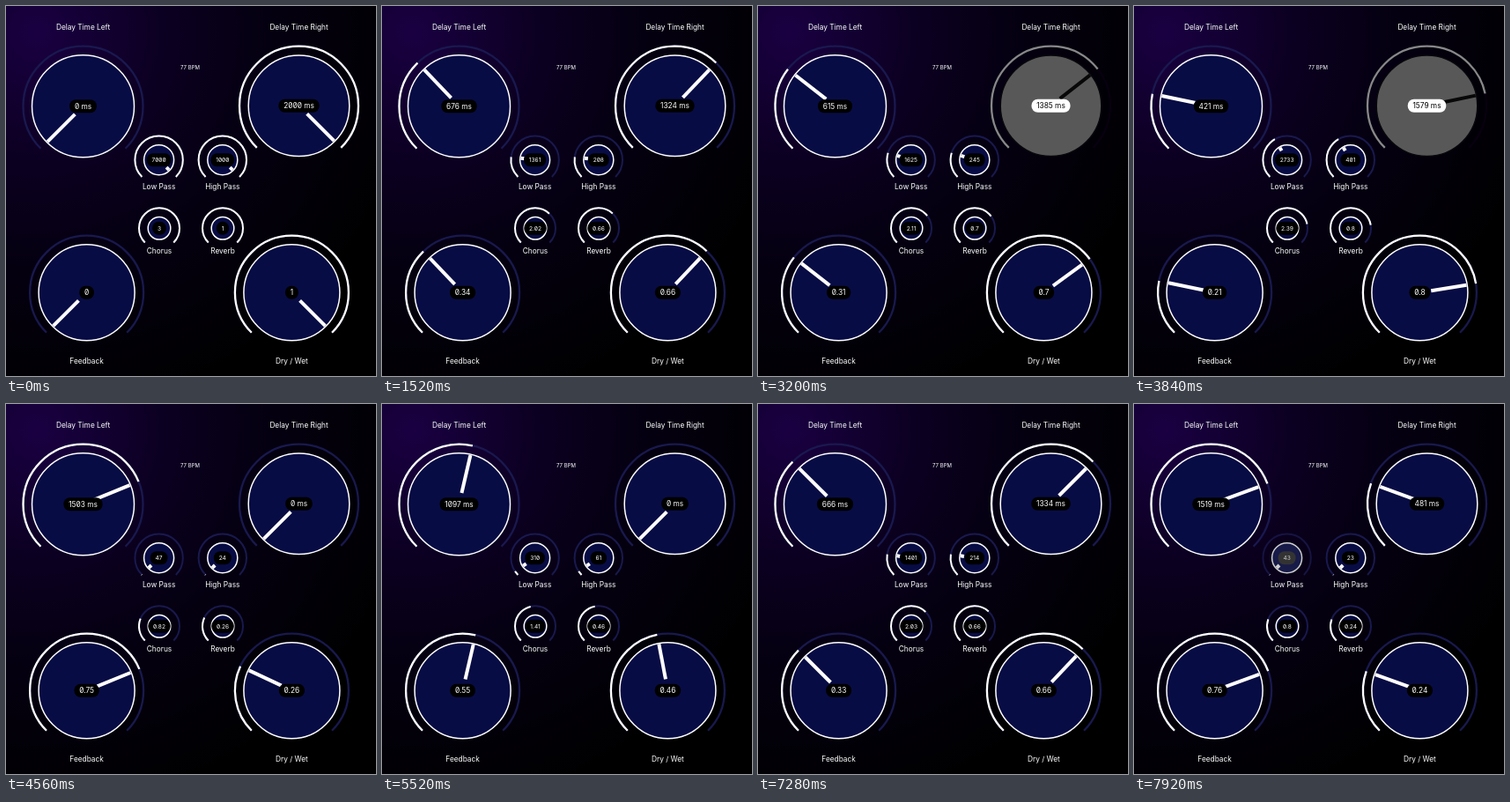
Animation, 420 px wide and 420 px high, one loop 8 s. Source, as an HTML page:

```html
<!DOCTYPE html>
<html lang="en">
<head>
<meta charset="utf-8">
<title>Delay controls</title>
<style>
  html, body { margin: 0; width: 100%; height: 100%; overflow: hidden; background: #000; }
  svg {
    display: block; width: 420px; height: 420px;
    background: radial-gradient(circle at 35px 30px, #1a0042, #0c0022 140px, #050011 260px, #000 440px);
    font: 8.3px Inter, sans-serif; font-feature-settings: "zero"; text-anchor: middle;
  }
  text { fill: #fff; }
  .knob { --flash: 0%; }
  .knob path, .knob line { fill: none; }
  .track { stroke: color-mix(in srgb, #08000f var(--flash), #19194f); }
  .level { stroke: color-mix(in srgb, #888 var(--flash), #fff); }
  .dial {
    fill: color-mix(in srgb, #585858 var(--flash), #080c44);
    stroke: color-mix(in srgb, #08080c var(--flash), #fff); stroke-width: 1.5;
  }
  .pointer { stroke: color-mix(in srgb, #080808 var(--flash), #fff); stroke-width: 4; }
  .pill { fill: color-mix(in srgb, #fff var(--flash), #000); }
  .value { fill: color-mix(in srgb, #000 var(--flash), #fff); }
</style>
</head>
<body>
<svg viewBox="0 0 420 420">
  <text x="209" y="71.8" font-size="6">77 BPM</text>
</svg>
<script>
const LOOP = 8000, STEP = 80;
const svg = document.querySelector('svg');

function add(parent, tag, attrs, text = '') {
  const el = document.createElementNS('http://www.w3.org/2000/svg', tag);
  for (const name in attrs) el.setAttribute(name, attrs[name]);
  el.textContent = text;
  return parent.appendChild(el);
}

// Piecewise linear curve through [time, value] points
function curve(points, t) {
  const i = points.findIndex(p => p[0] > t);
  if (i < 0) return points[points.length - 1][1];
  if (i === 0) return points[0][1];
  const [t0, v0] = points[i - 1], [t1, v1] = points[i];
  return v0 + (v1 - v0) * (t - t0) / (t1 - t0);
}

const SWEEP = [
  [0, 1], [1000, 1], [1520, .662], [2408, 0], [3200, .6925], [3560, 1], [4560, .2485],
  [4890, 0], [6250, .975], [6400, 1], [6780, 1], [7920, .2405], [8000, .188]
];
const RIGHT_FLASH = [[2560, 0], [2720, 1], [3920, 1], [4080, 0]];
const FILTER_FLASH = [[6320, 0], [6480, 1], [6800, 1], [6960, 0]];
const LOW_FLASH = [...FILTER_FLASH, [7840, 0], [7920, .2]];

const plain = v => String(+v.toFixed(2));
const millis = v => Math.round(v * 2000) + ' ms';
const hertz = max => v => String(Math.round(20 + (max - 20) * v));
const forward = u => u;
const inverse = u => 1 - u;
const quartic = u => u ** 4;
const coarse = u => Math.min(1, Math.round(u * 50 + .1) / 50);
const rightDelay = (u, t) => t >= 4000 && t < 6400 ? 0 : u;

function knob(label, labelY, x, y, dial, ring, level, format, flash = [[0, 0]]) {
  const big = dial > 50;
  const g = add(svg, 'g', { class: 'knob', transform: `translate(${x} ${y})` });
  const c = ring * Math.SQRT1_2;
  const d = `M${-c} ${c}A${ring} ${ring} 0 1 1 ${c} ${c}`;
  const width = big ? 2.3 : 2;
  add(g, 'path', { class: 'track', d, 'stroke-width': width });
  const arc = add(g, 'path', { class: 'level', d, 'stroke-width': width, pathLength: 100 });
  add(g, 'circle', { class: 'dial', r: dial });
  const pointer = add(g, 'line', { class: 'pointer', x1: big ? 13 : 12, x2: dial - .8 });
  if (dial < 15) pointer.remove();
  const pill = add(g, 'rect', { class: 'pill', y: -7.5, height: 15, rx: 7 });
  const value = add(g, 'text', { class: 'value', y: big ? 3 : 2.4, 'font-size': big ? 8.3 : 6.6 });
  add(svg, 'text', { x, y: labelY }, label);

  return (u, t) => {
    const v = level(u, t);
    arc.setAttribute('stroke-dasharray', `${v * 100} 200`);
    pointer.setAttribute('transform', `rotate(${135 + 270 * v})`);
    value.textContent = format(v);
    const w = value.getComputedTextLength() + 11.5;
    pill.setAttribute('x', -w / 2);
    pill.setAttribute('width', w);
    g.style.setProperty('--flash', curve(flash, t) * 100 + '%');
  };
}

const knobs = [
  knob('Delay Time Left', 26.5, 87.5, 113.7, 58, 68, inverse, millis),
  knob('Delay Time Right', 26.5, 332.5, 113.2, 57.3, 67.5, rightDelay, millis, RIGHT_FLASH),
  knob('Low Pass', 207.8, 173.6, 174.7, 17, 27.2, quartic, hertz(7000), LOW_FLASH),
  knob('High Pass', 207.8, 245.8, 174.7, 17, 27.2, quartic, hertz(1000), FILTER_FLASH),
  knob('Chorus', 280.8, 174, 252.3, 12.8, 23, forward, v => plain(.1 + 2.9 * v)),
  knob('Reverb', 280.8, 246, 252.3, 12.8, 23, coarse, plain),
  knob('Feedback', 406, 91.6, 325.2, 54.5, 64.5, inverse, plain),
  knob('Dry / Wet', 406, 324.4, 325.2, 54.5, 64.5, coarse, plain)
];

function draw(now) {
  const t = Math.floor(now % LOOP / STEP) * STEP;
  const u = curve(SWEEP, t);
  for (const update of knobs) update(u, t);
  requestAnimationFrame(draw);
}
draw(performance.now());
</script>
</body>
</html>
```
